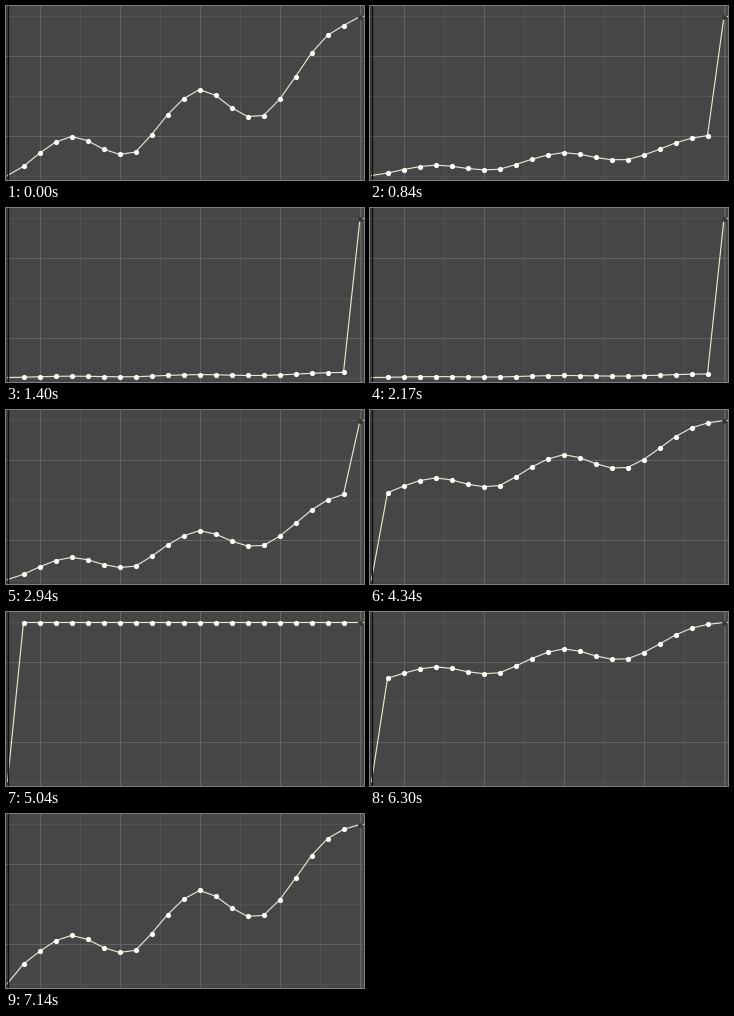
Animation of 358 by 174 pixels, one loop 7.21 s. Source, as a matplotlib script:

```python
import numpy as np
import matplotlib.pyplot as plt
from matplotlib.animation import FuncAnimation

W, H, DPI = 358, 174, 100
FRAMES, STEP_MS = 103, 70
PX = 72 / DPI

BACKGROUND, OUTSIDE = "#464646", "#3d3d3d"
MAJOR, MINOR = "#626262", "#525252"
CURVE, KEY = "#e9e8d2", "#ffffff"

LEFT, RIGHT = (2, 170), (354.5, 11)
KEY_X = np.arange(18, 339, 16)
KEY_Y = np.array([
    160.6, 147.2, 135.8, 130, 134.2, 143, 148.3, 146, 128.2, 107.7, 91.2,
    81.8, 87.8, 100.4, 109.5, 108.5, 92, 68.7, 44.4, 26.2, 16.2])


def blend_factor(i):
    """-1 puts the keys on the left neighbour, +1 on the right one."""
    if i < 23:
        u = 1 - i / 23
        return -1 + 0.975 * (0.15 * u + 0.85 * u * u)
    if i < 31:
        return -1
    if i < 72:
        return -0.977 + (i - 31) * 1.977 / 41
    return min(1, 1 - (i - 82) * 0.0466)


def blended_keys(factor):
    target = (LEFT if factor < 0 else RIGHT)[1]
    return KEY_Y + (target - KEY_Y) * abs(factor)


fig = plt.figure(figsize=(W / DPI, H / DPI), dpi=DPI, facecolor=BACKGROUND)
ax = fig.add_axes([0, 0, 1, 1])
ax.set_xlim(0.5, W + 0.5)
ax.set_ylim(H + 0.5, 0.5)
ax.axis("off")

ax.axvspan(0, LEFT[0], color=OUTSIDE, lw=0, zorder=0)
grid = dict(lw=PX, zorder=1)
for x in range(74, W, 80):
    ax.axvline(x, color=MINOR, **grid)
for y in (10, 90, 170):
    ax.axhline(y, color=MINOR, **grid)
for x in range(34, W, 80):
    ax.axvline(x, color=MAJOR, **grid)
for y in (50, 130):
    ax.axhline(y, color=MAJOR, **grid)
ax.axvline(355, color="#565c4a", lw=PX, zorder=2)
ax.axvline(LEFT[0], color="#101010", lw=1.3 * PX, zorder=5)

curve, = ax.plot([], [], color=CURVE, lw=1.15 * PX, zorder=3)
keys, = ax.plot([], [], "o", color=KEY, ms=5.2 * PX, mew=0, zorder=4)
ax.plot(*RIGHT, "o", color="#383838", ms=5 * PX, mew=0, zorder=4)


def draw(i):
    y = blended_keys(blend_factor(i))
    curve.set_data(np.r_[LEFT[0], KEY_X, RIGHT[0], W],
                   np.r_[LEFT[1], y, RIGHT[1], RIGHT[1]])
    keys.set_data(KEY_X, y)
    return curve, keys


anim = FuncAnimation(fig, draw, frames=FRAMES, interval=STEP_MS,
                     repeat=True, repeat_delay=0)
plt.show()
```
